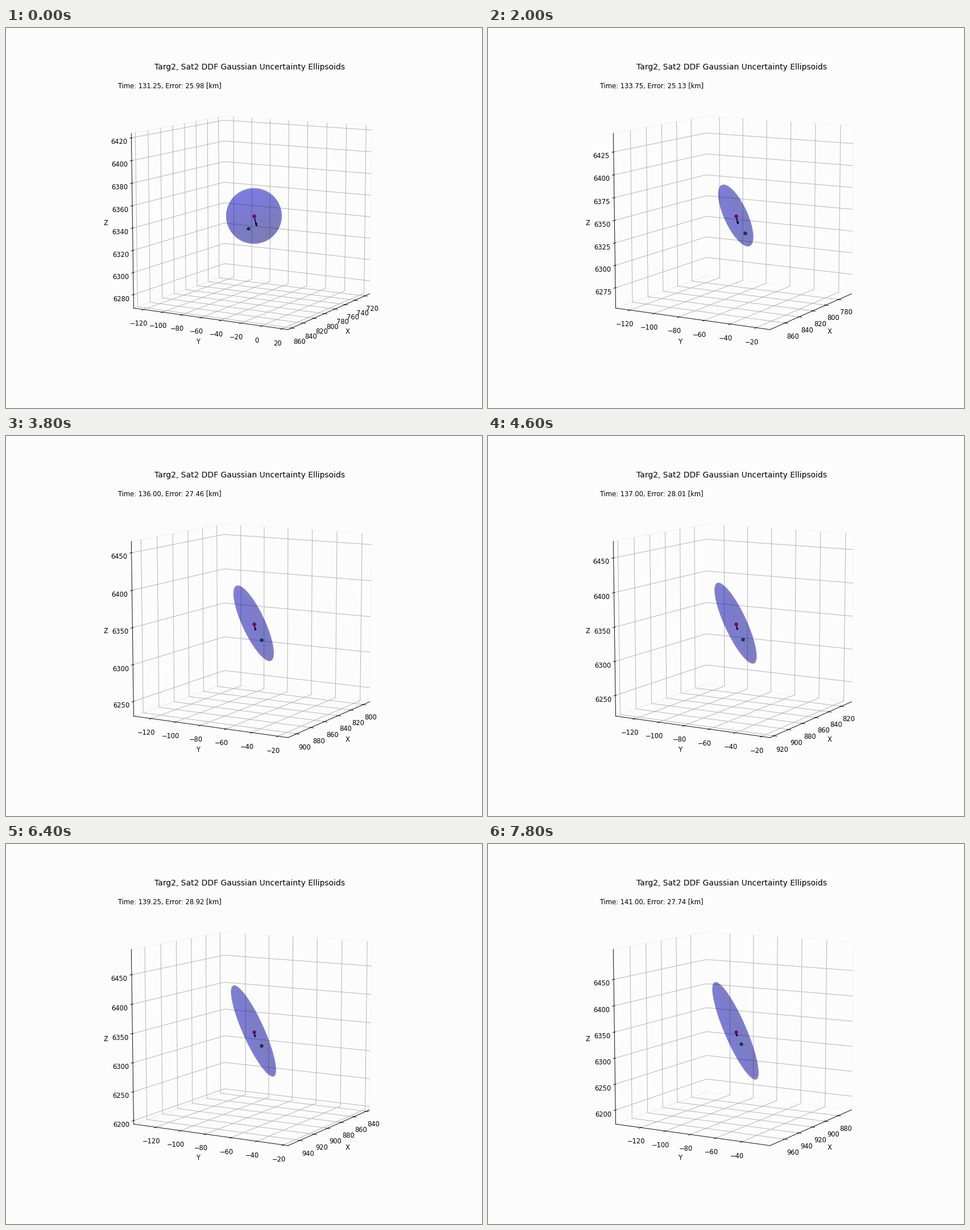
Animation of 837 by 669 pixels, one loop 8000 ms. Source, as a matplotlib script:

```python
import numpy as np
import matplotlib.pyplot as plt
from matplotlib.animation import FuncAnimation
from matplotlib.ticker import AutoLocator

FRAMES = 40
STEP_MS = 200
DPI = 83
BG = "#fcfcfc"
AZIM, ELEV = 30, 10
PX_PER_HALF = 153.15  # screen pixels per half axis length at the cube's centre

ERROR_STEPS = [0, 1, 6, 10, 19, 27, 32, 39]
ERROR_KM = [25.98, 21.6, 23.53, 25.13, 27.46, 28.55, 28.92, 27.74]

# Screen axes of the camera in cube coordinates: right, up, towards the viewer
az, el = np.radians([AZIM, ELEV])
VIEW = np.array([
    [-np.sin(az), np.cos(az), 0],
    [-np.sin(el) * np.cos(az), -np.sin(el) * np.sin(az), np.cos(el)],
    [np.cos(el) * np.cos(az), np.cos(el) * np.sin(az), np.sin(el)],
])

theta, phi = np.meshgrid(np.linspace(0, 2 * np.pi, 41),
                         np.linspace(0, np.pi, 29), indexing="ij")
NEAR = np.cos(theta) * np.sin(phi)
SIDE = np.sin(theta) * np.sin(phi)
UP = np.cos(phi)


class InnerLocator(AutoLocator):
    """Automatic ticks, kept off the small margin at both axis ends."""

    def tick_values(self, vmin, vmax):
        ticks = super().tick_values(vmin, vmax)
        margin = (vmax - vmin) / 50
        return ticks[(ticks >= vmin + margin) & (ticks <= vmax - margin)]


def track(i):
    """Estimated position and half lengths of the axes, in km."""
    if i == 0:
        return np.array([788.1, -52.5, 6345.85]), np.full(3, 78.125)
    center = [785.6 + 3.43 * i, -67.6 - 0.31 * i, 6349 - 9.45 * (i / 39)**2.5]
    return np.array(center), np.array([61, 61, 73.8 + 2.226 * i + 0.0042 * i**2])


def ellipsoid(i):
    """Surface as pixel offsets to the right, up and towards the viewer."""
    if i == 0:
        return 49 * SIDE, 49 * UP, 49 * NEAR
    wide = 24.3 + 0.748 * i - 0.0084 * i**2
    tall = 38.4 + 1.73 * i - 0.0132 * i**2
    tilt = 0.00025 * (36 - i)**2 - 0.86
    side = wide * (tilt * UP + np.sqrt(1 - tilt**2) * SIDE)
    return side, tall * UP, 60 * NEAR + 0.75 * tall * UP


def true_offset(i):
    """Pixel offset of the true position from the estimate."""
    if i == 0:
        return -10.4, -22
    wobble = 1.2 * np.sin(np.pi * (i - 7) / 10)
    return 17.2 - 0.18 * i + wobble, 0.0065 * i**2 - 30.9


fig = plt.figure(figsize=(837.01 / DPI, 669.01 / DPI), dpi=DPI, facecolor=BG)
ax = fig.add_subplot(111, projection="3d", computed_zorder=False)
ax.set_facecolor(BG)
ax.set_box_aspect((1, 1, 1))
ax.view_init(elev=ELEV, azim=AZIM)
for axis in (ax.xaxis, ax.yaxis, ax.zaxis):
    axis.pane.fill = False
    axis.set_major_locator(InnerLocator())
ax.set_xlabel("X")
ax.set_ylabel("Y")
ax.set_zlabel("Z")
ax.set_title("Targ2, Sat2 DDF Gaussian Uncertainty Ellipsoids")
info = ax.text2D(0.05, 0.95, "", transform=ax.transAxes)
parts = []


def update(i):
    center, half = track(i)

    def offset(right, up, near=0.0):
        """Pixel offsets along the screen axes as data offsets."""
        px = np.stack(np.broadcast_arrays(right, up, near), axis=-1)
        return px @ VIEW * half / PX_PER_HALF

    while parts:
        parts.pop().remove()

    shell = center + offset(*ellipsoid(i))
    truth = center + offset(*true_offset(i))
    speed = (1390 - 4 * i) / half[2]
    arrow = offset(0.28 * speed, -speed)

    parts.append(ax.quiver(*center, *arrow, color="k", zorder=2))
    parts.append(ax.scatter(*center, color="r", depthshade=False, zorder=3))
    parts.append(ax.scatter(*truth, color="g", depthshade=False, zorder=3))
    parts.append(ax.plot_surface(*np.moveaxis(shell, -1, 0), rstride=1,
                                 cstride=1, color="b", alpha=0.3, zorder=4))

    lims = zip(center - half, center + half)
    for set_lim, lim in zip((ax.set_xlim, ax.set_ylim, ax.set_zlim), lims):
        set_lim(*lim)
    error = np.interp(i, ERROR_STEPS, ERROR_KM)
    info.set_text(f"Time: {131.25 + i / 4:.2f}, Error: {error:.2f} [km]")
    return [*parts, info]


anim = FuncAnimation(fig, update, frames=FRAMES, interval=STEP_MS,
                     repeat=True, repeat_delay=0, blit=False)
plt.show()
```
